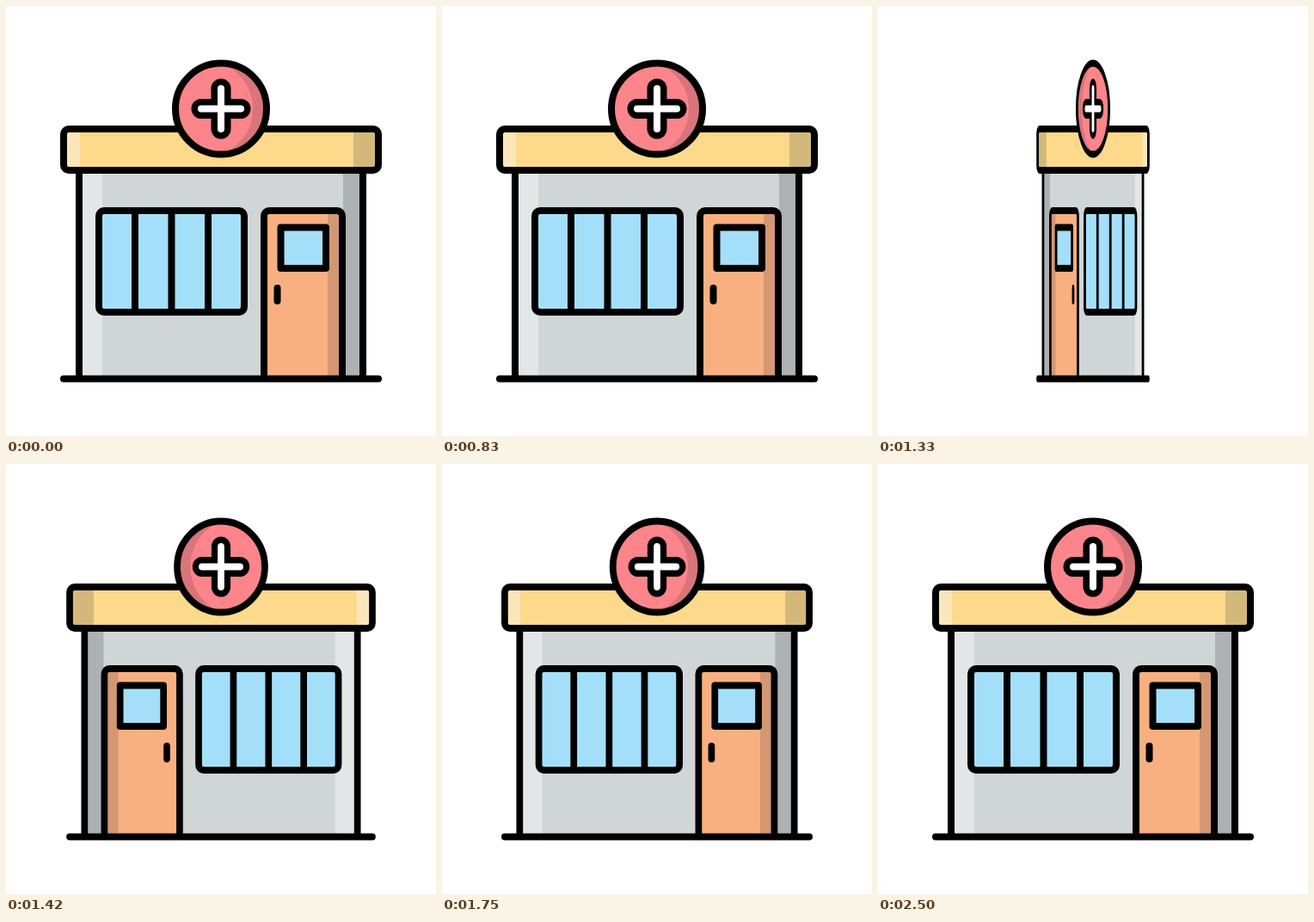
An HTML page with a canvas that plays this animation: 500 px wide and 500 px high, repeating every 2580 ms.

```html
<!DOCTYPE html>
<html lang="en">
<head>
<meta charset="utf-8">
<title>Spinning pharmacy</title>
<style>
  html, body { margin: 0; width: 100%; height: 100%; overflow: hidden; background: #fff; }
  canvas { display: block; width: 500px; height: 500px; }
</style>
</head>
<body>
<canvas id="stage" width="500" height="500"></canvas>
<script>
const ctx = document.getElementById('stage').getContext('2d');

const LOOP = 2580;
const STEP = 1000 / 12;
const SPIN_START = 1032.5;
const SPIN_END = 1849;

const INK = '#000';
const GLASS = '#a4dff9';
const LINE = 8;

function fillRect(x1, y1, x2, y2, color) {
  ctx.fillStyle = color;
  ctx.fillRect(x1, y1, x2 - x1, y2 - y1);
}

function line(x1, y1, x2, y2, width = LINE, color = INK) {
  ctx.lineWidth = width;
  ctx.strokeStyle = color;
  ctx.beginPath();
  ctx.moveTo(x1, y1);
  ctx.lineTo(x2, y2);
  ctx.stroke();
}

function outline(x1, y1, x2, y2, radius) {
  ctx.lineWidth = LINE;
  ctx.strokeStyle = INK;
  ctx.beginPath();
  ctx.roundRect(x1, y1, x2 - x1, y2 - y1, radius);
  ctx.stroke();
}

function disc(x, y, r, color) {
  ctx.fillStyle = color;
  ctx.beginPath();
  ctx.arc(x, y, r, 0, Math.PI * 2);
  ctx.fill();
}

function drawWall() {
  fillRect(85, 190, 415, 433, '#d0d5d7');
  fillRect(85, 190, 112, 433, '#e3e6e7');
  fillRect(392, 190, 415, 433, '#acb1b3');
  line(85, 191, 85, 433);
  line(415, 191, 415, 433);
}

function drawWindow() {
  fillRect(108, 238, 277, 356, GLASS);
  for (const x of [150, 192.5, 235]) line(x, 238, x, 356);
  outline(108, 238, 277, 356, 6);
}

function drawDoor() {
  fillRect(301, 239, 391, 433, '#f9b080');
  fillRect(374, 239, 391, 433, '#d39772');
  outline(300, 238, 391, 440, [6, 6, 0, 0]);
  fillRect(319.5, 257.5, 372, 305, GLASS);
  outline(319.5, 257.5, 372, 305, 0);
  line(315.5, 328, 315.5, 343);
}

function drawRoof() {
  fillRect(69, 145, 431, 189, '#fcd98b');
  fillRect(69, 145, 86, 189, '#fbe6bb');
  fillRect(404, 145, 431, 189, '#d2b97b');
  outline(67, 143, 433, 191, 6);
}

function drawSign() {
  ctx.save();
  ctx.beginPath();
  ctx.arc(250, 119.5, 53, 0, Math.PI * 2);
  ctx.clip();
  disc(250, 119.5, 53, '#d9757a');
  disc(231, 119.5, 56, '#fb858b');
  ctx.restore();

  ctx.lineWidth = LINE;
  ctx.strokeStyle = INK;
  ctx.beginPath();
  ctx.arc(250, 119.5, 53, 0, Math.PI * 2);
  ctx.stroke();

  for (const [width, color] of [[23, INK], [8, '#fff']]) {
    line(227, 119.5, 273, 119.5, width, color);
    line(250, 96, 250, 143, width, color);
  }
}

// The picture advances twelve times a second, on times rounded to 10 ms.
function heldTime(t) {
  const startOf = n => 10 * Math.round(n * STEP / 10);
  let n = Math.floor(t / STEP);
  if (startOf(n + 1) <= t) n++;
  else if (startOf(n) > t) n--;
  return n * STEP;
}

function spinAngle(t) {
  const u = Math.min(1, Math.max(0, (t - SPIN_START) / (SPIN_END - SPIN_START)));
  return 2 * Math.PI * u * u * (3 - 2 * u);
}

function draw(t) {
  ctx.setTransform(1, 0, 0, 1, 0, 0);
  fillRect(0, 0, 500, 500, '#fff');
  ctx.translate(250, 0);
  ctx.scale(Math.cos(spinAngle(heldTime(t))), 1);
  ctx.translate(-250, 0);
  ctx.lineCap = ctx.lineJoin = 'round';

  drawWall();
  drawWindow();
  ctx.save();
  ctx.beginPath();
  ctx.rect(60, 60, 380, 374);
  ctx.clip();
  drawDoor();
  ctx.restore();
  line(67, 433.5, 433, 433.5);
  drawRoof();
  drawSign();
}

const begin = performance.now();
function tick() {
  draw((performance.now() - begin) % LOOP);
  requestAnimationFrame(tick);
}
tick();
</script>
</body>
</html>
```
